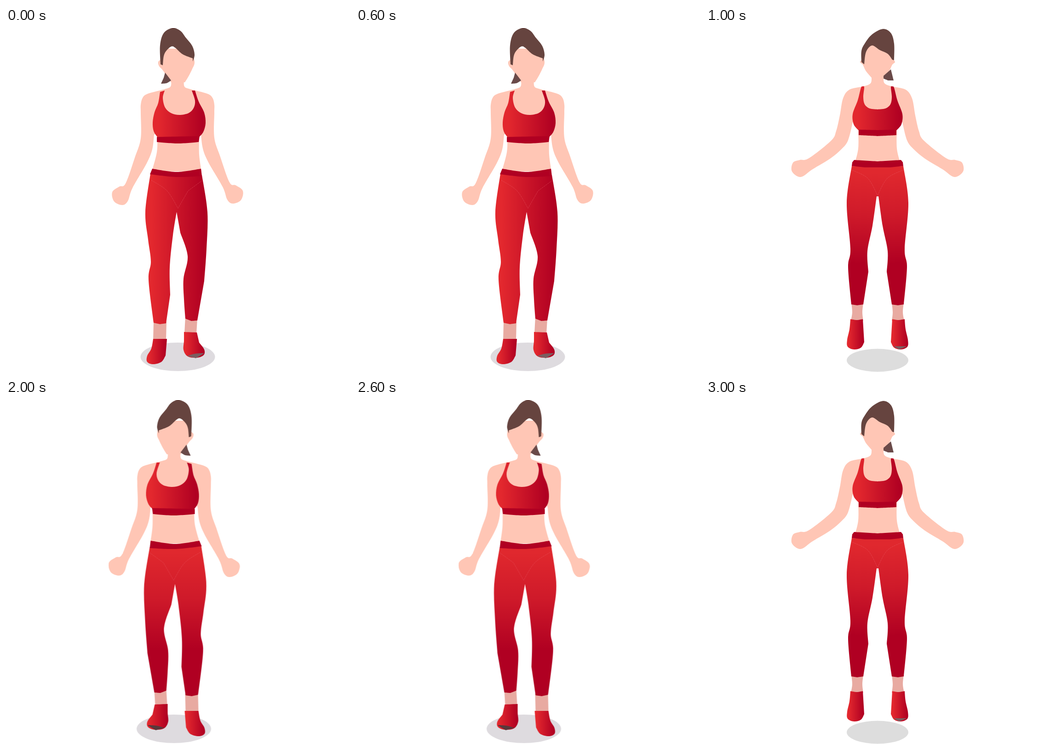
Animation of 748 by 748 pixels, one loop 4000 ms. Source, as an HTML page:

```html
<!DOCTYPE html>
<html lang="en">
<head>
<meta charset="utf-8">
<title>Jumping on the spot</title>
<style>
  html, body { margin: 0; width: 100%; height: 100%; overflow: hidden; background: #fff; }
  svg { display: block; width: 100vw; height: 100vh; --lr: url(#across); --legs: url(#across); --sole: #7b5d60; }
  .skin { fill: #ffc6b5; }
  .ankle { fill: #e8aaa1; }
  .hair { fill: #66443f; }
  .tail { fill: #6a4a49; }
  .band { fill: #b00022; }
  .sole { fill: var(--sole); }
  .cloth { fill: var(--lr); }
  .legs { fill: var(--legs); }
  .seam { fill: none; stroke: #e8606a; stroke-dasharray: 4 1; opacity: .45; }
  .pose { opacity: 0; animation: 4s step-end infinite; }
  #right { animation-name: right; }
  #air { animation-name: air; --legs: url(#down); }
  #left { animation-name: left; --lr: url(#back); --legs: url(#down); --sole: #58383b; }
  .flip { --lr: url(#back); }
  @keyframes right { 0% { opacity: 1 } 25%, 100% { opacity: 0 } }
  @keyframes air { 0%, 50%, 100% { opacity: 0 } 25%, 75% { opacity: 1 } }
  @keyframes left { 0%, 75%, 100% { opacity: 0 } 50% { opacity: 1 } }
</style>
</head>
<body>
<svg viewBox="0 0 748 748">
  <defs>
    <linearGradient id="across">
      <stop offset=".1" stop-color="#e3282e"/><stop offset=".95" stop-color="#b00022"/>
    </linearGradient>
    <linearGradient id="back" href="#across" x1="1" x2="0"/>
    <linearGradient id="down" x2="0" y2="1">
      <stop offset=".05" stop-color="#e0282e"/><stop offset=".35" stop-color="#cf1a2a"/><stop offset=".7" stop-color="#b00022"/>
    </linearGradient>
    <g id="stand">
      <ellipse cx="373.5" cy="715" rx="81" ry="31" fill="#dedbdf"/>
      <path id="arm" class="skin" data-pts="374 112 / 359 112 358 127 345 133 308 143 297 152 293 167 293 185 293 240 280 282 260 338 246 345 231 357 235 377 253 385 265 376 275 348 306 294 318 264 322 232 / 345 215 374 215"/>
      <use href="#arm" transform="matrix(-1 0 0 .987 746 1.8)"/>
      <path class="skin" data-pts="329 235 328 270 317 312 / 425 312 420 275 420 235"/>
      <path class="skin" data-pts="344 45 / 337 68 331 74 333 83 341 92 359 118 / 389 118 397 105 405 89 410 74 404 45"/>
      <path class="hair" data-pts="341 81 / 336 79 335 38 343 11 362 0 379 6 391 21 405 39 410 58 406 73 / 406 66 384 57 368 43 360 40 349 49 343 61 341 81"/>
      <path class="tail" data-pts="346 97 / 359 114 349 120 337 121 / 343 108 346 97"/>
      <path class="cloth" data-pts="335 139 / 345 136 341 152 346 173 359 185 377 189 397 185 408 174 411 158 404 136 / 411 136 419 160 431 184 434 207 429 226 420 237 / 329 237 321 224 319 205 323 183 331 163 335 139"/>
      <path class="band" data-pts="328 237 421 235 / 419 248 374 251 328 248"/>
      <path class="ankle" data-pts="321 638 349 638 / 348 678 320 678"/>
      <path class="ankle" data-pts="390 628 416 632 / 414 665 388 663"/>
      <path class="legs" data-pts="314 317 303 400 309 460 315 508 310 548 321 641 / 335 644 348 642 / 357 580 356 520 363 450 371 400 / 379 445 395 496 386 545 387 590 390 632 / 403 637 416 636 / 431 550 436 480 438 400 426 320"/>
      <path class="seam" data-pts="316 331 350 354 374 392 / 396 354 426 332"/>
      <path class="band" data-pts="318 306 371 313 424 306 / 426 322 370 324 313 318"/>
      <path class="cloth" data-pts="320 676 350 676 / 347 712 338 726 320 731 307 726 307 713 316 697 320 676"/>
      <path class="cloth" data-pts="387 661 415 662 / 420 684 431 699 430 711 415 717 395 714 386 700 387 680 387 661"/>
      <path class="sole" data-pts="394 713 412 708 431 707 / 413 718 394 713"/>
    </g>
  </defs>

  <g id="right" class="pose"><use href="#stand"/></g>

  <g id="air" class="pose">
    <ellipse cx="373" cy="722.5" rx="67" ry="25" fill="#ddd"/>
    <path class="skin" data-twin data-pts="374 106 / 360 106 358 120 342 127 312 134 298 153 291 190 283 224 272 245 224 283 204 287 189 293 187 312 206 324 232 307 270 284 295 263 309 244 319 205 / 350 190 374 190"/>
    <path class="skin" data-twin data-pts="374 218 / 331 218 331 262 323 295 / 374 295"/>
    <path class="skin" data-twin data-pts="374 30 / 345 45 339 67 335 74 341 80 348 94 360 108 / 374 108"/>
    <path class="tail" data-pts="402 90 408 114 / 396 114 386 110 / 386 104"/>
    <path class="hair" data-pts="344 79 / 338 74 338 50 345 34 361 14 385 2 402 11 409 34 409 70 / 405 69 395 56 378 48 361 38 348 52 344 79"/>
    <path class="cloth" data-twin data-pts="374 222 / 331 222 321 209 319 187 330 157 337 130 341 127 344 129 342 150 345 166 356 175 374 177"/>
    <path class="band" data-twin data-pts="374 222 332 221 / 332 233 374 235"/>
    <path class="ankle" data-twin data-pts="316 598 318 618 315 637 / 342 637 340 618 342 598"/>
    <path class="legs" data-twin data-pts="374 303 / 317 300 306 380 314 480 309 520 316 601 / 329 603 342 601 / 353 530 351 485 362 430 371 366 / 374 366"/>
    <path class="seam" data-twin data-pts="318 309 352 327 373 364"/>
    <path class="band" data-twin data-pts="374 290 322 287 / 318 292 317 300 / 345 303 374 303"/>
    <path id="sock" class="cloth" data-pts="314 633 328 635 341 633 / 344 683 337 695 322 699 308 693 307 678 312 655 314 633"/>
    <use class="flip" href="#sock" transform="matrix(-1 0 0 1 746 0)"/>
    <path class="sole" data-pts="408 692 437 692 / 420 699 408 692"/>
  </g>

  <g id="left" class="pose"><use href="#stand" transform="matrix(-1 0 0 1 738.5 0)"/></g>
</svg>
<script>
  const axis = 373;
  const mirror = ([x, y]) => [2 * axis - x, y];

  // Smooth curve through the points of one run
  function bend(run) {
    const at = i => run[Math.max(0, Math.min(run.length - 1, i))];
    let d = "";
    for (let i = 0; i < run.length - 1; i++) {
      const [a, b, c, e] = [-1, 0, 1, 2].map(k => at(i + k));
      const c1 = b.map((v, k) => v + (c[k] - a[k]) / 6);
      const c2 = c.map((v, k) => v - (e[k] - b[k]) / 6);
      d += "C" + [c1, c2, c].join(" ");
    }
    return d;
  }

  // Runs are joined by straight lines
  const trace = runs => runs.map((run, i) => (i ? "L" : "M") + run[0] + bend(run)).join("");

  const read = text => text.split("/").map(part => {
    const n = part.trim().split(/\s+/).map(Number);
    return n.flatMap((x, i) => i % 2 ? [] : [[x, n[i + 1]]]);
  });

  for (const path of document.querySelectorAll("[data-pts]")) {
    const runs = read(path.dataset.pts);
    let d = trace(runs);
    if ("twin" in path.dataset) d += trace(runs.map(r => r.map(mirror).reverse()).reverse());
    path.setAttribute("d", d);
  }
</script>
</body>
</html>
```
